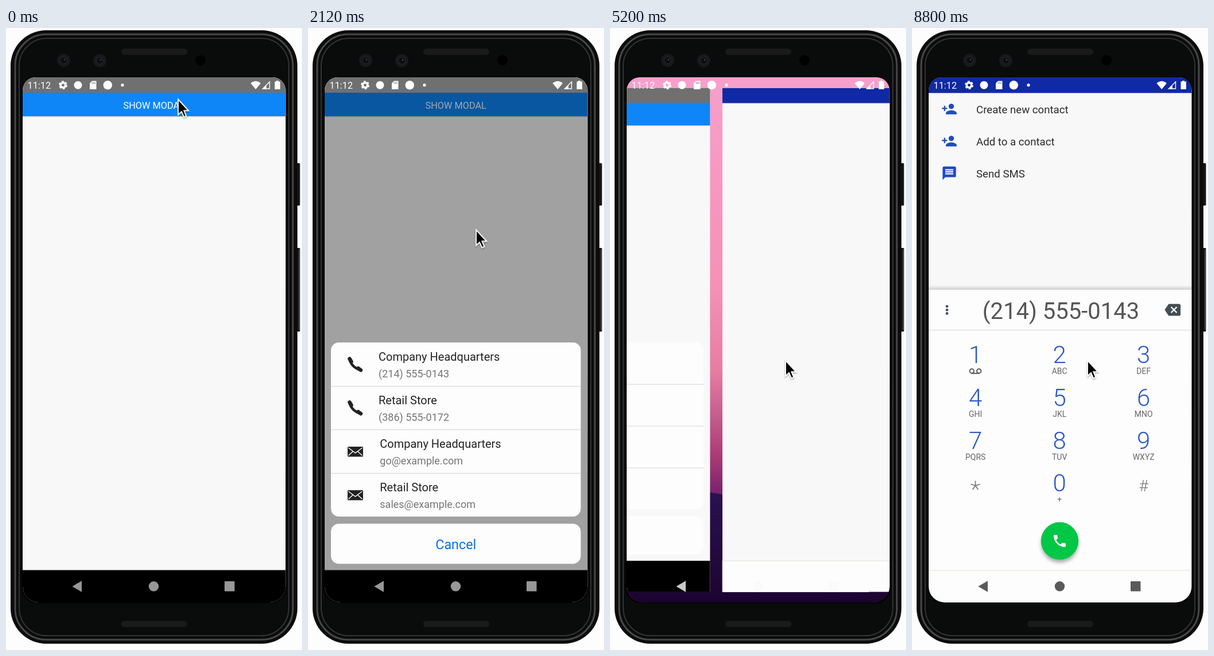
These frames come from a looping animation (516 by 1086 pixels, 8900 ms). An HTML page:

```html
<!DOCTYPE html>
<html lang="en">
<head>
<meta charset="utf-8">
<title>Contact sheet</title>
<style>
html, body { margin: 0; width: 100%; height: 100%; overflow: hidden; background: #fdfdfd; }
svg { display: block; width: 516px; height: 1086px; font-family: Roboto, sans-serif; }
.mid { text-anchor: middle; }
.title { font-size: 20px; fill: #232323; }
.sub { font-size: 18px; fill: #757575; }
.item { font-size: 18.67px; fill: #2b2b2b; }
.digit { font-size: 42px; font-weight: 300; fill: #2a56c6; }
.letters { font-size: 14px; fill: #666; }

#app, #dialer, #dim, #sheet, #row1, #ripple, #list, #pad, #cursor, .nav { animation: 8900ms linear infinite; }
#app, #dialer { transform-origin: 258.25px 544.5px; }
#app { animation-name: leave, shrink; }
#dialer { animation-name: enter, grow; }
#dim { animation-name: dim; }
#sheet { animation-name: sheet; }
#row1 { animation-name: press; }
#ripple { animation-name: ripple; transform-origin: 309px 134px; }
#list { animation-name: list; }
#pad { animation-name: list, pad; }
#cursor { animation-name: cursor; }
.nav { animation-name: nav; }
.nav.back { animation-name: navback; }

@keyframes ripple {
  0%, 2.8% { transform: scale(.1); opacity: 0; }
  3.4% { transform: scale(.2); opacity: 1; }
  7.64% { transform: scale(1); opacity: 1; }
  10.7% { transform: scale(1.6); opacity: 1; }
  12.4%, 100% { transform: scale(1.6); opacity: 0; }
}
@keyframes sheet {
  0%, 4.91% { transform: translateY(833px); animation-timing-function: cubic-bezier(.333,.667,.667,1); }
  11.2%, 100% { transform: none; }
}
@keyframes dim {
  0%, 4.91% { opacity: 0; animation-timing-function: cubic-bezier(.333,.667,.667,1); }
  11.2%, 54.6% { opacity: .35; }
  56%, 100% { opacity: 0; }
}
@keyframes press {
  0%, 43.6% { opacity: 1; }
  45.3%, 48.9% { opacity: .2; }
  51.7%, 100% { opacity: 1; }
}
@keyframes leave {
  0%, 55.73% { translate: 0; animation-timing-function: cubic-bezier(.2,0,0,1); }
  65.39%, 100% { translate: -461px; }
}
@keyframes shrink {
  0%, 54.6% { scale: 1; animation-timing-function: ease-out; }
  56.6%, 100% { scale: .959; }
}
@keyframes enter {
  0%, 55.73% { translate: 461px; animation-timing-function: cubic-bezier(.2,0,0,1); }
  65.39%, 100% { translate: 0; }
}
@keyframes grow {
  0%, 65.17% { scale: .959; animation-timing-function: cubic-bezier(.2,0,0,1); }
  74.61%, 100% { scale: 1; }
}
@keyframes list {
  0%, 75.27% { opacity: 0; }
  75.28%, 100% { opacity: 1; }
}
@keyframes pad {
  0%, 75.28% { transform: translateY(560px); animation-timing-function: cubic-bezier(.2,0,0,1); }
  79.2%, 100% { transform: none; }
}
@keyframes cursor {
  0%, 16.5% { transform: translate(300px,124.5px); animation-timing-function: ease-in; }
  23.82% { transform: translate(293px,352px); animation-timing-function: ease-out; }
  33%, 100% { transform: translate(306px,580.5px); }
}
@keyframes nav {
  0%, 54.9% { fill: #979797; }
  56.5%, 62% { fill: #fafafa; }
  66.5%, 100% { fill: #5a5a5a; }
}
@keyframes navback {
  0%, 54.9% { fill: #979797; }
  56.5%, 61% { fill: #c8c8c8; }
  66.5%, 100% { fill: #5a5a5a; }
}
</style>
</head>
<body>
<svg viewBox="0 0 516 1086">
  <defs>
    <linearGradient id="wall" gradientUnits="userSpaceOnUse" x1="0" y1="86" x2="0" y2="815">
      <stop offset="0" stop-color="#f6a0cb"/>
      <stop offset=".5" stop-color="#f690b6"/>
      <stop offset=".7" stop-color="#e67ea3"/>
      <stop offset=".82" stop-color="#c25a8c"/>
      <stop offset=".91" stop-color="#a93a74"/>
      <stop offset="1" stop-color="#77216d"/>
    </linearGradient>
    <linearGradient id="hill" x1="0" y1="0" x2="0" y2="1">
      <stop offset="0" stop-color="#2a1150"/>
      <stop offset="1" stop-color="#1c0430"/>
    </linearGradient>
    <linearGradient id="fade" x1="0" y1="0" x2="0" y2="1">
      <stop offset="0" stop-color="#000" stop-opacity="0"/>
      <stop offset="1" stop-color="#000" stop-opacity=".16"/>
    </linearGradient>
    <filter id="soft" x="-50%" y="-50%" width="200%" height="200%"><feGaussianBlur stdDeviation="3.5"/></filter>
    <filter id="drop" x="-50%" y="-50%" width="200%" height="200%"><feDropShadow dx="0" dy="1.5" stdDeviation="1.3" flood-opacity=".4"/></filter>
    <clipPath id="screen"><path d="M29 109A23 23 0 0 1 52 86H464.500A23 23 0 0 1 487.500 109V975A28 28 0 0 1 459.500 1003H57A28 28 0 0 1 29 975Z"/></clipPath>
    <clipPath id="card"><rect x="40" y="549" width="435.500" height="304" rx="14"/></clipPath>
    <clipPath id="button"><rect x="29" y="113" width="458.500" height="41"/></clipPath>
    <path id="call" d="M6.620 10.790c1.440 2.830 3.760 5.140 6.590 6.590l2.200-2.200c.27-.27.67-.36 1.020-.24 1.120.37 2.330.57 3.570.57.55 0 1 .45 1 1V20c0 .55-.45 1-1 1-9.390 0-17-7.610-17-17 0-.55.45-1 1-1h3.500c.55 0 1 .45 1 1 0 1.250.2 2.450.57 3.570.11.35.03.74-.25 1.020z"/>
    <path id="add" d="M15 12c2.210 0 4-1.790 4-4s-1.790-4-4-4-4 1.790-4 4 1.790 4 4 4zm-9-2V7H4v3H1v2h3v3h2v-3h3v-2H6zm9 4c-2.670 0-8 1.340-8 4v2h16v-2c0-2.660-5.330-4-8-4z"/>
    <g id="handset" fill="none" stroke="#222" stroke-linecap="round">
      <path d="M72.500 579Q76 592 91.500 597.500" stroke-width="4.500"/>
      <path d="M72.500 577.500L75.500 582.500M87.500 594L92 597.300" stroke-width="6.500"/>
    </g>
    <g id="mail">
      <rect x="69" y="731" width="27" height="17.500" rx="1.500" fill="#222"/>
      <path d="M70.500 733L82.500 742L94.500 733M70.500 746.500L78 739.500M94.500 746.500L87 739.500" fill="none" stroke="#fdfdfd" stroke-width="1.400"/>
    </g>
  </defs>

  <!-- handset body -->
  <g fill="#151515">
    <rect x="505" y="236" width="7.500" height="74" rx="1.500"/>
    <rect x="505" y="384" width="7.500" height="146" rx="1.500"/>
    <path d="M511 387V527" stroke="#6a6a6a"/>
  </g>
  <rect x="8" y="4" width="500" height="1071" rx="62" fill="#0b0c0a"/>
  <rect x="16" y="11" width="484" height="1057" rx="54" fill="#0a0b0b" stroke="#484848" stroke-width="3"/>
  <rect x="23" y="18" width="470" height="1043" rx="48" fill="#0a0b0b" stroke="#333335" stroke-width="2"/>
  <g fill="#1a1a1a">
    <rect x="201" y="36" width="115" height="11" rx="5.500"/>
    <rect x="201" y="1035" width="115" height="11" rx="5.500"/>
  </g>
  <g fill="#17191c">
    <circle cx="100.500" cy="56.500" r="11.500"/><circle cx="163.500" cy="57" r="11.500"/>
    <g fill="#0b0d10" stroke="#2a2e33"><circle cx="100.500" cy="56.500" r="6"/><circle cx="163.500" cy="57" r="6"/></g>
    <g fill="#39404a"><circle cx="102" cy="55" r="1.500"/><circle cx="165" cy="55.500" r="1.500"/></g>
  </g>
  <circle cx="339" cy="56.500" r="9" fill="#000"/>

  <rect x="27" y="85" width="462" height="919" rx="26" fill="#000"/>
  <g clip-path="url(#screen)">
    <rect x="28" y="85" width="461" height="920" fill="url(#wall)"/>
    <path d="M28 850Q110 800 176 811Q300 830 489 900V1005H28Z" fill="url(#hill)"/>

    <g id="app">
      <rect x="29" y="86" width="458.500" height="917" fill="#f8f8f8"/>
      <rect x="29" y="86" width="458.500" height="27.500" fill="#707070"/>
      <rect x="29" y="153" width="458.500" height="2.500" fill="#000" opacity=".14"/>
      <rect x="29" y="113" width="458.500" height="41" fill="#0e86f8"/>
      <g clip-path="url(#button)"><circle id="ripple" cx="309" cy="134" r="180" fill="#000" fill-opacity=".08"/></g>
      <text class="mid" x="257.700" y="140.700" font-size="16.300" fill="#fff">SHOW MODAL</text>
      <rect id="dim" x="29" y="113" width="458.500" height="834"/>
      <g id="sheet">
        <g clip-path="url(#card)">
          <g id="row1">
            <rect x="40" y="549" width="436" height="76" fill="#fdfdfd"/>
            <use href="#handset"/>
            <text class="title" x="123" y="580.800">Company Headquarters</text>
            <text class="sub" x="123" y="610">(214) 555-0143</text>
          </g>
          <rect x="40" y="625" width="436" height="228" fill="#fdfdfd"/>
          <use href="#handset" y="76"/>
          <text class="title" x="123" y="656.800">Retail Store</text>
          <text class="sub" x="123" y="686">(386) 555-0172</text>
          <use href="#mail"/>
          <text class="title" x="125.300" y="732.800">Company Headquarters</text>
          <text class="sub" x="125.300" y="762">go@example.com</text>
          <use href="#mail" y="76"/>
          <text class="title" x="125.300" y="808.800">Retail Store</text>
          <text class="sub" x="125.300" y="838">sales@example.com</text>
          <path d="M40 625.500H476M40 701.500H476M40 777.500H476" stroke="#d3d3d0"/>
        </g>
        <rect x="40" y="865.500" width="435.500" height="70" rx="14" fill="#fdfdfd"/>
        <text class="mid" x="257.700" y="910" font-size="23.300" fill="#0a6fe8">Cancel</text>
      </g>
      <rect x="29" y="946.500" width="458.500" height="57"/>
    </g>

    <g id="dialer">
      <rect x="29" y="86" width="458.500" height="917" fill="#f8f8f8"/>
      <rect x="29" y="86" width="458.500" height="27.500" fill="#1029a4"/>
      <g id="list">
        <g fill="#1f4bc0">
          <use href="#add" transform="translate(51 127.500) scale(1.167)"/>
          <use href="#add" transform="translate(51 183.500) scale(1.167)"/>
          <path transform="translate(51 239.500) scale(1.167)" d="M20 2H4c-1.100 0-1.990.9-1.990 2L2 22l4-4h14c1.100 0 2-.9 2-2V4c0-1.100-.9-2-2-2zm-2 12H6v-2h12v2zm0-3H6V9h12v2zm0-3H6V6h12v2z"/>
        </g>
        <text class="item" x="112" y="148.700">Create new contact</text>
        <text class="item" x="112" y="204.700">Add to a contact</text>
        <text class="item" x="112" y="260.700">Send SMS</text>
      </g>
      <g id="pad">
        <rect x="29" y="449" width="458.500" height="8" fill="url(#fade)"/>
        <rect x="29" y="457" width="458.500" height="491" fill="#fdfdfd"/>
        <g fill="#3c4668"><circle cx="61" cy="486" r="2.300"/><circle cx="61" cy="492.200" r="2.300"/><circle cx="61" cy="498.400" r="2.300"/></g>
        <text class="mid" x="259.500" y="507.500" font-size="40" fill="#555">(214) 555-0143</text>
        <path fill="#454d55" transform="translate(440.500 478.300) scale(1.150)" d="M22 3H7c-.69 0-1.230.35-1.590.88L0 12l5.410 8.110c.36.53.9.89 1.590.89h15c1.100 0 2-.9 2-2V5c0-1.100-.9-2-2-2zm-3 12.590L17.590 17 14 13.410 10.410 17 9 15.590 12.590 12 9 8.410 10.410 7 14 10.590 17.590 7 19 8.410 15.410 12 19 15.590z"/>
        <path d="M29 527.500H488" stroke="#d9d9e2"/>
        <g id="keys"></g>
        <g fill="none" stroke="#555" stroke-width="1.900">
          <circle cx="104.300" cy="599" r="3.700"/><circle cx="116.700" cy="599" r="3.700"/><path d="M104 603H117"/>
        </g>
        <path d="M110.500 790.500V799M102.500 796.500L110.500 799L118.500 796.500M105.500 806L110.500 799L115.500 806" fill="none" stroke="#777" stroke-width="1.700"/>
        <text class="mid" x="403.700" y="808.500" font-size="28" font-weight="300" fill="#777">#</text>
        <circle cx="257.500" cy="901" r="32" opacity=".35" filter="url(#soft)"/>
        <circle cx="257.500" cy="895.500" r="32.700" fill="#00c745"/>
        <use href="#call" fill="#fff" transform="translate(243.500 881.500) scale(1.167)"/>
      </g>
      <rect x="29" y="946.500" width="458.500" height="56.500" fill="#fdfdfd"/>
      <path d="M29 947H488" stroke="#e2e2d8"/>
    </g>

    <!-- system bars -->
    <g fill="#fff">
      <text x="37.500" y="105.700" font-size="16.300">11:12</text>
      <circle cx="99.500" cy="99.700" r="4.200" fill="none" stroke="#fff" stroke-width="3.500"/>
      <circle cx="99.500" cy="99.700" r="6.500" fill="none" stroke="#fff" stroke-width="2" stroke-dasharray="3.800 3.007"/>
      <circle cx="125.500" cy="99.700" r="7"/>
      <path d="M150 92.500H157.500V107H146V96.500Z"/>
      <path d="M150.300 94.500V97.500M152.700 94.500V97.500M155.100 94.500V97.500" stroke="#777" stroke-width="1.100"/>
      <circle cx="177.300" cy="99.700" r="7.700"/>
      <circle cx="203" cy="99.700" r="2.600"/>
      <path d="M426.500 96.500Q435.300 89 444 96.500L435.300 107Z"/>
      <path d="M459.500 94V106H447.500Z" fill="none" stroke="#fff" stroke-width="1.400"/>
      <path d="M454 99.500V106.500H447Z"/>
      <path d="M471 92H475V93.500H478V107H468.500V93.500H471Z"/>
    </g>
    <path class="nav back" d="M115.500 975L132 965.200V984.800Z"/>
    <circle class="nav" cx="257.500" cy="974.800" r="8.700"/>
    <rect class="nav" x="381" y="966" width="17.500" height="17.500" rx="1"/>
  </g>

  <g id="cursor">
    <path d="M0 0V27L6 21.500L10.200 31L14.300 29.200L10.300 19.800H18.300Z" fill="#000" stroke="#fff" stroke-width="1.900" filter="url(#drop)"/>
  </g>
</svg>
<script>
const keys = document.getElementById('keys');
const letters = ['+', '', 'ABC', 'DEF', 'GHI', 'JKL', 'MNO', 'PQRS', 'TUV', 'WXYZ'];

function label(cls, x, y, str) {
  const el = document.createElementNS('http://www.w3.org/2000/svg', 'text');
  el.setAttribute('class', cls + ' mid');
  el.setAttribute('x', x);
  el.setAttribute('y', y);
  el.textContent = str;
  keys.append(el);
}

letters.forEach((str, n) => {
  const slot = n ? n - 1 : 10;
  const x = 110.7 + 146.5 * (slot % 3);
  const y = 585 + 74.8 * Math.floor(slot / 3);
  label('digit', x, y, n);
  label('letters', x, y + 19, str);
});
</script>
</body>
</html>
```
